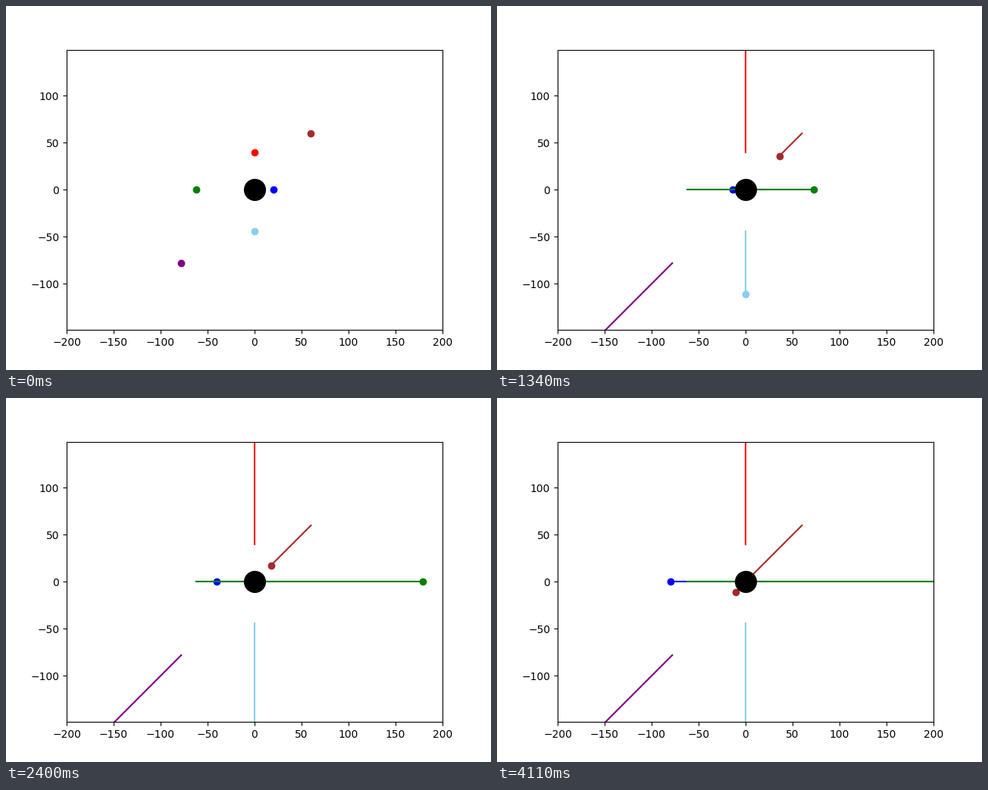
A matplotlib script that plays this animation: 640 by 480 pixels, repeating every 4130 ms.

```python
import numpy as np
import matplotlib.pyplot as plt
from matplotlib.animation import FuncAnimation

STEPS = 200
TICK = 10  # ms
DIAG = np.sqrt(0.5)

# colour, start, velocity
BODIES = [
    ("blue", (20, 0), (-1, 0)),
    ("green", (-62, 0), (4, 0)),
    ("red", (0, 40), (0, 3.9)),
    ("purple", (-78, -78), (-6 * DIAG, -6 * DIAG)),
    ("brown", (60, 60), (-DIAG, -DIAG)),
    ("skyblue", (0, -44), (0, -2)),
]

# Steps without visible movement: the step before them is held longer.
STILL = {135, 156, 159, 162, 164, 167, 170, 172, 175, 177, 180, 183, 196}

clock = np.linspace(0, 100, STEPS)
timeline = []
for step in range(STEPS):
    if step not in STILL:
        hold = 50 if step + 1 in STILL else 20
        timeline += [step] * (hold // TICK)

fig, ax = plt.subplots(figsize=(6.4, 4.8), dpi=100)
ax.set_xlim(-200, 200)
half = 200 * 369.6 / 496  # equal scale on both axes
ax.set_ylim(-half, half)

trails = [
    ax.plot([], [], "o-", color=color, markevery=[-1])[0]
    for color, _, _ in BODIES
]
ax.plot(0, 0, "o", color="black", markersize=20)


def update(i):
    t = clock[timeline[i]]
    for trail, (_, (x, y), (vx, vy)) in zip(trails, BODIES):
        trail.set_data([x, x + vx * t], [y, y + vy * t])
    return trails


anim = FuncAnimation(fig, update, frames=len(timeline), interval=TICK,
                     repeat=True, repeat_delay=0, blit=False)
plt.show()
```
